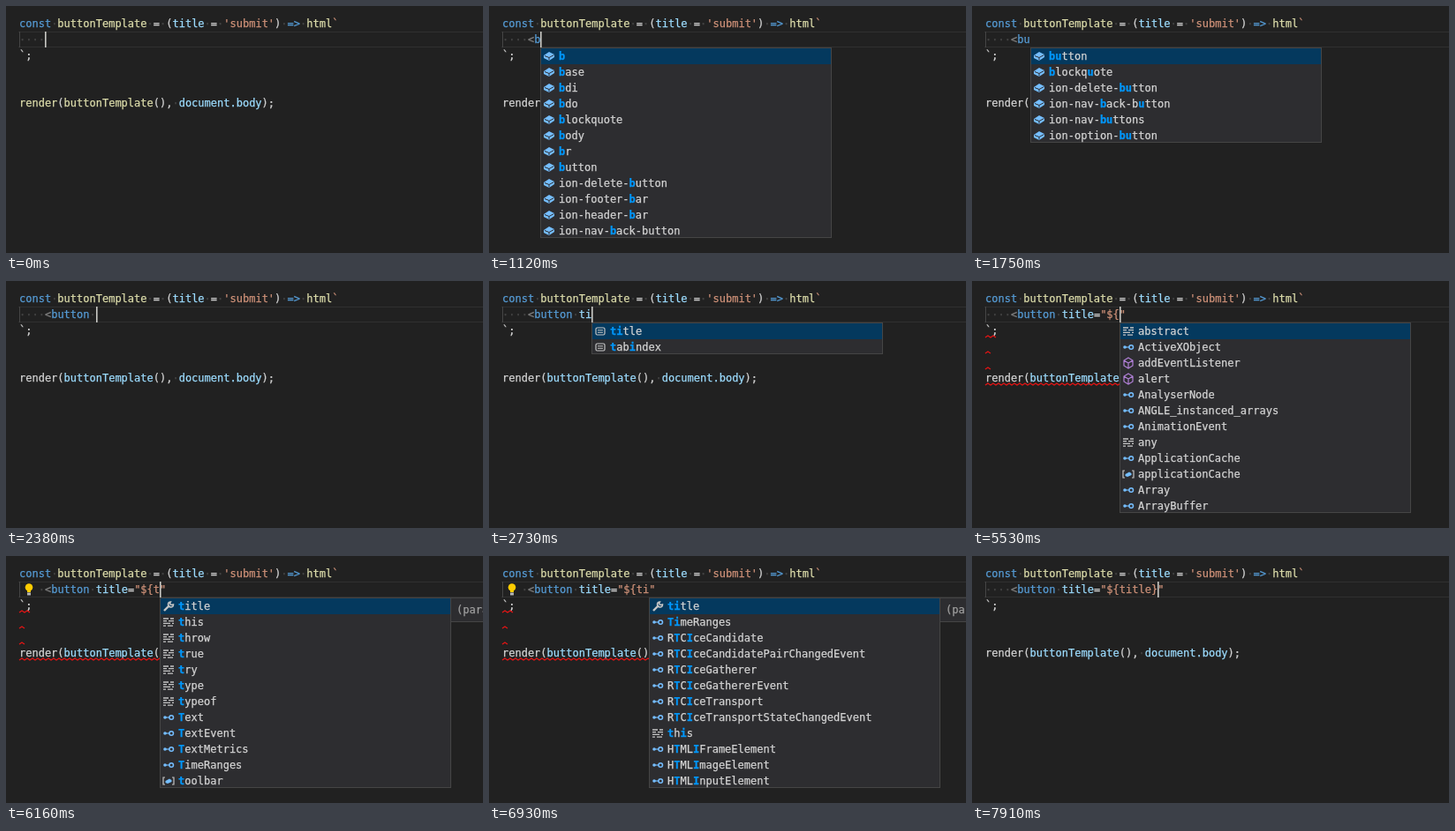
These frames come from a looping animation (540x280 px, 8 s). An HTML page:

```html
<!DOCTYPE html>
<html lang="en">
<head>
<meta charset="utf-8">
<style>
  html, body { margin: 0; width: 100%; height: 100%; overflow: hidden; background: #212121; }
  svg { display: block; width: 540px; height: 280px; }
  text { font: 12px "DejaVu Sans Mono", "Liberation Mono", monospace; white-space: pre; stroke-width: .25px; }
</style>
</head>
<body>
<svg id="stage" viewBox="0 0 540 280"></svg>
<script>
const LOOP = 8000, LEFT = 15, CHAR = 7.224, ROW = 18, POPUP_TOP = 47, POPUP_WIDTH = 330, BLINK = 500;
const C = { plain: '#d4d4d4', key: '#569cd6', fn: '#dcdcaa', name: '#9cdcfe', str: '#ce9178',
            dim: '#808080', dot: '#444', match: '#0097fb', icon: '#c5c5c5', blue: '#75beff', purple: '#b180d7' };

const escapeText = s => s.replace(/&/g, '&amp;').replace(/</g, '&lt;');
const span = (color, s, extra = '') =>
  s ? `<tspan fill="${color}" stroke="${color}" ${extra}>${escapeText(s)}</tspan>` : '';
const text = (x, y, body) => `<text x="${x}" y="${y}">${body}</text>`;
const rect = (x, y, w, h, fill, extra = '') =>
  `<rect x="${x}" y="${y}" width="${w}" height="${h}" fill="${fill}" ${extra}/>`;
const stroke = (d, color, width = 1.2) =>
  `<path d="${d}" fill="none" stroke="${color}" stroke-width="${width}"/>`;

// Spaces appear as faint dots.
const token = (color, s) => s.split(/( )/)
  .map(part => part === ' ' ? span(C.dot, '·') : span(color, part)).join('');
const codeLine = (row, tokens) =>
  text(LEFT, 24 + row * ROW, tokens.map(([color, s]) => token(C[color], s)).join(''));

const icons = {
  block: '<path d="M-6-1 0-5 6-2 6 1 0 5-6 2z" fill="#75beff"/>' + stroke('M-5-.5 0 1.5 5.5-1.5M0 1.5V4.5', '#2d2d30', 1),
  attr: rect(-5, -4, 10, 8, 'none', 'rx="1.5" stroke="#c5c5c5" stroke-width="1.2"') + stroke('M-3-1.2H3M-3 1.3H3', C.icon, 1),
  keyword: stroke('M-6-4H0M2-4H6M-6-1.3H-2M0-1.3H6M-6 1.4H2M4 1.4H6M-6 4.1H-3M-1 4.1H5', C.icon, 1.3),
  type: `<circle cx="-4" r="1.8" fill="${C.blue}"/>` + stroke('M-4 0H1', C.blue) +
        `<circle cx="3.2" r="2.3" fill="none" stroke="${C.blue}" stroke-width="1.5"/>`,
  method: stroke('M0-6 5-3V3L0 6-5 3V-3zM-5-3 0 0 5-3M0 0V6', C.purple),
  variable: stroke('M-4-4H-6V4H-4M4-4H6V4H4', C.icon) + `<path d="M-3.500 0 1-2.500 3.500-1V1L-1 3-3.500 2z" fill="${C.blue}"/>`,
  wrench: stroke('M-5 5 1-1', C.icon, 2.4) + stroke('M2.500-5A3 3 0 1 0 5.500-2L3-1.500 1.500-3z', C.icon, 1.5)
};

const items = (icon, names) => names.split(' ').map(name => {
  const [label, own] = name.split(':');
  return [own || icon, label];
});
const lists = {
  tagB: items('block', 'b base bdi bdo blockquote body br button ion-delete-button ion-footer-bar ion-header-bar ion-nav-back-button'),
  tagBu: items('block', 'button blockquote ion-delete-button ion-nav-back-button ion-nav-buttons ion-option-button'),
  attrTi: items('attr', 'title tabindex'),
  all: items('type', 'abstract:keyword ActiveXObject addEventListener:method alert:method AnalyserNode ANGLE_instanced_arrays AnimationEvent any:keyword ApplicationCache applicationCache:variable Array ArrayBuffer'),
  nameT: items('type', 'title:wrench this:keyword throw:keyword true:keyword try:keyword type:keyword typeof:keyword Text TextEvent TextMetrics TimeRanges toolbar:variable'),
  nameTi: items('type', 'title:wrench TimeRanges RTCIceCandidate RTCIceCandidatePairChangedEvent RTCIceGatherer RTCIceGathererEvent RTCIceTransport RTCIceTransportStateChangedEvent this:keyword HTMLIFrameElement HTMLImageElement HTMLInputElement')
};

// Each step: start time, text before the cursor, text after it, popup list, query, detail panel.
const steps = [
  { at: 0, before: '' },
  { at: 70, before: '<' },
  { at: 1050, before: '<b', list: 'tagB', query: 'b' },
  { at: 1190, before: '<bu', list: 'tagBu', query: 'bu' },
  { at: 1960, before: '<button' },
  { at: 2380, before: '<button ' },
  { at: 2590, before: '<button t' },
  { at: 2700, before: '<button ti', list: 'attrTi', query: 'ti' },
  { at: 3080, before: '<button title="', after: '"' },
  { at: 5180, before: '<button title="$', after: '"' },
  { at: 5530, before: '<button title="${', after: '"', list: 'all', query: '' },
  { at: 6090, before: '<button title="${t', after: '"', list: 'nameT', query: 't', detail: true },
  { at: 6300, before: '<button title="${ti', after: '"', list: 'nameTi', query: 'ti', detail: true },
  { at: 7280, before: '<button title="${title', after: '"' },
  { at: 7560, before: '<button title="${title}', after: '"' }
];

function typedLine(s) {
  const [, open, tag, gap, attr, equals, value] = s.match(/^(<?)(\w*)( ?)(\w*)(=?)(.*)$/);
  return codeLine(1, [['plain', '    '], ['dim', open], ['key', tag], ['plain', gap],
    ['name', attr], ['plain', equals], ['str', value]]);
}

function label(name, query) {
  let next = 0;
  return [...name].map(ch => {
    const hit = next < query.length && ch.toLowerCase() === query[next];
    if (hit) next++;
    return hit ? span(C.match, ch, 'font-weight="bold"') : span(C.plain, ch);
  }).join('');
}

function popup(x, { list, query, detail }) {
  const rows = lists[list], height = rows.length * ROW;
  let out = rect(x + .5, POPUP_TOP + .5, POPUP_WIDTH - 1, height - 1, '#2d2d30', 'stroke="#454545"') +
    rect(x + 1, POPUP_TOP + 1, POPUP_WIDTH - 2, ROW, '#04395e');
  rows.forEach(([icon, name], i) => {
    const y = POPUP_TOP + i * ROW;
    out += `<g transform="translate(${x + 10} ${y + 10})">${icons[icon]}</g>` +
      text(x + 21, y + 14, label(name, query));
  });
  if (detail) {
    const left = x + POPUP_WIDTH;
    out += rect(left - .5, POPUP_TOP + .5, 200, 27, '#2d2d30', 'stroke="#454545"') +
      text(left + 6, 65, span('#a0a0a0', '(parameter) title: string'));
  }
  return out;
}

function squiggle(row, chars) {
  let d = `M${LEFT} ${28 + row * ROW}`;
  for (let i = 0; i < chars * CHAR / 3 - 1; i++) d += `l3 ${i % 2 ? 2 : -2}`;
  return stroke(d, '#e51414', 1.3);
}

const bulb = rect(17, 30, 17, 16, '#212121') +
  '<circle cx="26" cy="35.500" r="4.300" fill="#fc0"/>' + rect(24, 39, 4, 2, '#fc0') +
  rect(24, 41.5, 4, 3, '#b5b5b5');

const firstLine = codeLine(0, [['key', 'const'], ['fn', ' buttonTemplate'], ['plain', ' = ('], ['name', 'title'],
  ['plain', ' = '], ['str', "'submit'"], ['plain', ') '], ['key', '=>'], ['fn', ' html'], ['str', '`']]);
const closing = codeLine(2, [['plain', '`;']]);
const currentLine = rect(14, 29, 526, 1, '#303030') + rect(14, 46, 526, 1, '#303030') + rect(15, 29, 1, 18, '#454545');

function scene(t) {
  const step = steps.filter(s => s.at <= t).pop();
  const { at, before, after = '' } = step;
  const column = 4 + before.length;
  const x = Math.round(LEFT + column * CHAR);
  const fresh = t < 70;
  let out = rect(0, 0, 540, 280, '#212121') + currentLine + firstLine + typedLine(before + after) + closing +
    codeLine(5, [[fresh ? 'fn' : 'plain', 'render'], ['plain', '('], [fresh ? 'fn' : 'name', 'buttonTemplate'],
      ['plain', '(), '], ['name', 'document.body'], ['plain', ');']]);
  if (t >= 5530 && t < 7770)
    out += squiggle(2, 2) + squiggle(3, 1) + squiggle(4, 1) + squiggle(5, 40);
  if (t >= 6090 && t < 7280) out += bulb;
  if (Math.floor((t - at) / BLINK) % 2 === 0) out += rect(x, 29, 1.6, 18, '#c8c8c4');
  if (step.list) out += popup(x, step);
  return out;
}

const stage = document.getElementById('stage');
const start = performance.now();
let shown = '';
function draw(now) {
  const next = scene(Math.max(0, now - start) % LOOP);
  if (next !== shown) stage.innerHTML = shown = next;
  requestAnimationFrame(draw);
}
draw(start);
</script>
</body>
</html>
```
